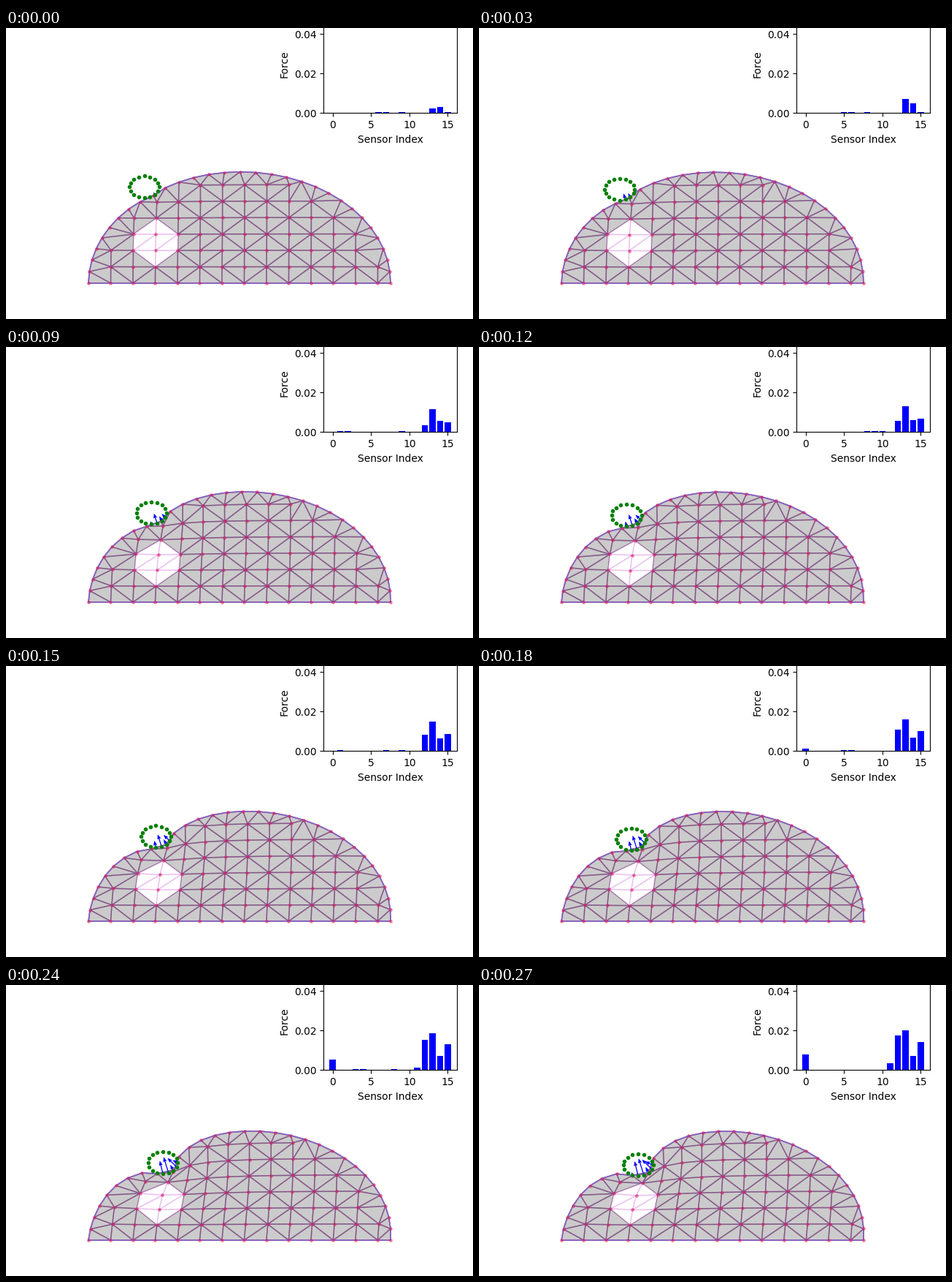
Recreate the animation shown at these times as a matplotlib script. Size 640 by 398 pixels, loop 0.3 s.

```python
import numpy as np
import matplotlib.pyplot as plt
from matplotlib.animation import FuncAnimation
from matplotlib.collections import LineCollection
from matplotlib.tri import Triangulation

W, H, DPI = 640, 398, 100
FRAMES, STEP_MS = 10, 30
CX, CY, RX, RY = 320, 349, 207, 152.5     # half-ellipse body
ASPECT = RY / RX
GRID = 0.1473                             # node spacing in body radii
BALL_R = 20.4
SENSORS = 16


def rising(k, r):
    """Which way the diagonal of a grid cell runs."""
    flipped = k < 6 and r < 2
    return (k < 6 and r == 2) or (k + r + flipped) % 2 == 1


def build_mesh():
    """Nodes in unit-radius coordinates, edges, grid lookup, arc size."""
    arc = np.radians(np.arange(180, -1, -6))
    nodes = list(np.round(np.column_stack([np.cos(arc), np.sin(arc)]), 9))
    grid = {}
    for r in range(7):
        for k in range(15):
            node = np.array([-1 + GRID * k, GRID * r])
            if np.hypot(*node) < 0.95:
                grid[k, r] = len(nodes)
                nodes.append(node)
    nodes = np.array(nodes)
    key_of = {n: key for key, n in grid.items()}

    def cell(k, r):
        keys = [(k, r), (k + 1, r), (k + 1, r + 1), (k, r + 1)]
        return [grid[key] for key in keys if key in grid]

    def in_full_cell(tri):
        if any(n not in key_of for n in tri):
            return False
        keys = np.array([key_of[n] for n in tri])
        return np.ptp(keys, axis=0).max() <= 1 and len(cell(*keys.min(axis=0))) == 4

    tris = [list(t) for t in Triangulation(*nodes.T).triangles
            if not in_full_cell(t)]
    for k, r in grid:
        if len(cell(k, r)) == 4:
            a, b, c, d = cell(k, r)
            tris += [[a, b, c], [a, c, d]] if rising(k, r) else [[a, b, d], [b, c, d]]
    edges = Triangulation(*nodes.T, triangles=tris).edges
    return nodes, edges, grid, len(arc)


nodes, edges, grid, n_arc = build_mesh()
rest = np.column_stack([CX + RX * nodes[:, 0], CY - RY * nodes[:, 1]])
bottom = sorted((n for (k, r), n in grid.items() if r == 0), reverse=True)
outline = list(range(n_arc)) + bottom
hole_ring = [grid[k] for k in [(3, 4), (4, 3), (4, 2), (3, 1), (2, 2), (2, 3)]]


def ball_center(i):
    return np.array([189.6 + 3.17 * i, 217.4 + 3.21 * i])


def deform(i):
    """Soft push away from the contact, then clear the ball."""
    x, y = rest.T
    dist = np.hypot(x - 190, (y - 231) / ASPECT)
    depth = 1 - np.hypot(*nodes.T)
    grip = np.sin(np.pi / 2 * np.minimum(1, 1.4 * nodes[:, 1]))
    damp = 1 - 0.3 * np.clip(depth / 0.15, 0, 1)
    left = np.clip((190 - x) / 24, 0, 1) ** 2
    dx = grip * (5 + 25 / (1 + (dist / 50) ** 2))
    dy = (27 * damp * np.sqrt(grip) / (1 + (dist / 55) ** 2)
          - 9 * grip ** 2 * left)
    pos = rest + (0.08 + 0.1022 * i) * np.column_stack([dx, dy])

    center = ball_center(i)
    rel = pos - center
    gap = np.hypot(rel[:, 0], rel[:, 1] / ASPECT) / BALL_R
    inside = gap < 1
    pos[inside] = center + rel[inside] / gap[inside, None]
    return pos


# Sensor: (first force, onset step, last force, bend of the ramp)
RAMPS = {11: (0, 7, 3.6, 1.4), 12: (0, 1.9, 17.5, 0.9),
         13: (2.5, 0, 20, 0.6), 14: (3.1, 0, 7.3, 0.4),
         15: (0.3, 1.9, 14.1, 0.6), 0: (0.2, 5, 8, 1.4)}
ACTIVE = list(RAMPS)


def forces(i):
    f = np.zeros(SENSORS)
    if i < FRAMES - 1:      # faint noise
        rng = np.random.default_rng(i)
        f[rng.integers(1, 11, 3)] = 0.0003
    for s, (first, onset, last, bend) in RAMPS.items():
        t = max(0, i - onset) / (FRAMES - 1 - onset)
        f[s] = (first + (last - first) * t ** bend) / 1000
    return f


def polar(radius, degrees):
    a = np.radians(degrees)
    return np.column_stack([radius * np.cos(a), -ASPECT * radius * np.sin(a)])


def sensor_points(i):
    return ball_center(i) + polar(BALL_R, 360 / SENSORS * np.arange(SENSORS))


def pushes(f):
    """Arrow vectors, leaning further left around the ball."""
    turn = np.array([(s - 12 + 8) % SENSORS - 8 for s in ACTIVE])
    return polar(1600 * f[ACTIVE], 100 + 3 * turn ** 2)


plt.rcParams["font.family"] = "DejaVu Sans"
fig = plt.figure(figsize=(W / DPI, H / DPI), dpi=DPI, facecolor="white")

# Scene in pixel coordinates
scene = fig.add_axes([0, 0, 1, 1])
scene.set_xlim(0, W)
scene.set_ylim(H, 0)
scene.axis("off")
body, = scene.fill([0], [0], color="#cbcbcb", lw=0, zorder=1)
frame_lines = LineCollection([], colors="#706a6e", linewidths=1.1, zorder=2)
hole, = scene.fill([0], [0], color="white", lw=0, zorder=3)
tint_lines = LineCollection([], colors="#bc37cd", linewidths=1.2, alpha=0.3,
                            zorder=4)
scene.add_collection(frame_lines)
scene.add_collection(tint_lines)
rim, = scene.plot([], [], color="#8a62c4", lw=1.2, zorder=5)
dots, = scene.plot([], [], "o", color="#e01050", ms=3.3, mew=0, alpha=0.55,
                   zorder=6)
zeros = np.zeros(len(ACTIVE))
arrows = scene.quiver(zeros, zeros, zeros, zeros, color="blue", angles="xy",
                      scale_units="xy", scale=1, units="dots", width=1.3,
                      headwidth=4, headlength=5, headaxislength=4.5, zorder=7)
ball, = scene.plot([], [], "o", color="green", ms=4, mew=0, zorder=8)

# Force chart, running off the top of the stage
chart = fig.add_axes([435 / W, 1 - 116.3 / H, 183 / W, 135 / H])
chart.patch.set_visible(False)
bars = chart.bar(range(SENSORS), np.zeros(SENSORS), color="blue")
chart.set_xlim(-1.19, 16.19)
chart.set_ylim(0, 0.05)
chart.set_xticks([0, 5, 10, 15])
chart.set_yticks([0, 0.02, 0.04], ["0.00", "0.02", "0.04"])
chart.set_xlabel("Sensor Index")
chart.set_ylabel("Force")


def update(i):
    pos = deform(i)
    body.set_xy(pos[outline])
    hole.set_xy(pos[hole_ring])
    frame_lines.set_segments(pos[edges])
    tint_lines.set_segments(pos[edges])
    rim.set_data(*pos[outline + outline[:1]].T)
    dots.set_data(*pos.T)

    f = forces(i)
    ring = sensor_points(i)
    ball.set_data(*ring.T)
    arrows.set_offsets(ring[ACTIVE])
    arrows.set_UVC(*pushes(f).T)
    for bar, height in zip(bars, f):
        bar.set_height(height)
    return []


anim = FuncAnimation(fig, update, frames=FRAMES, interval=STEP_MS,
                     repeat=True, repeat_delay=0, blit=False)
plt.show()
```
